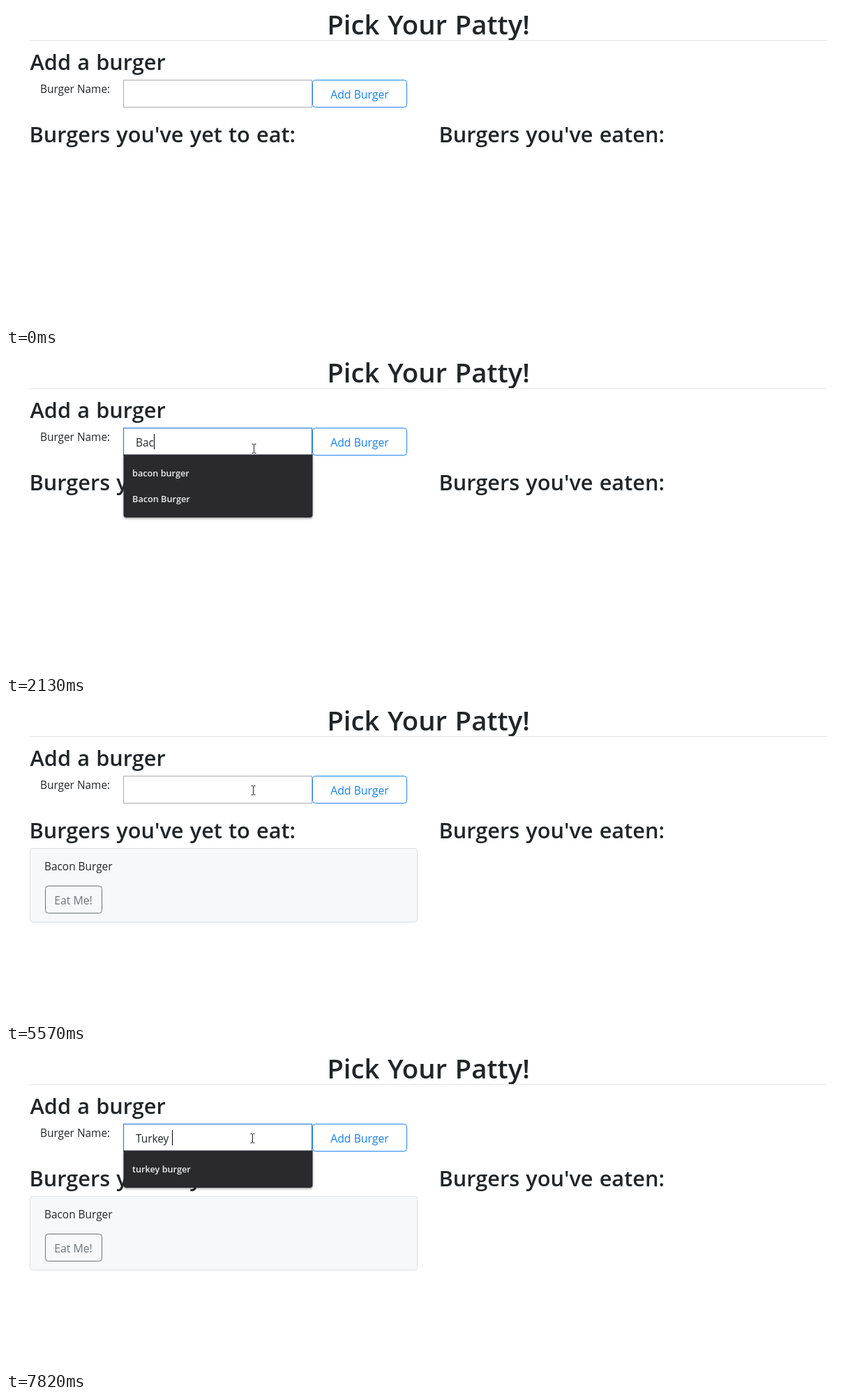
Animation, 1217 px wide and 460 px high, one loop 8 s. Source, as an HTML page:

```html
<!DOCTYPE html>
<html lang="en">
<head>
<meta charset="utf-8">
<title>Burger list</title>
<style>
  html, body { margin: 0; width: 100%; height: 100%; overflow: hidden; background: #fff; }
  svg { display: block; width: 100%; height: 100%; }
  text { font: 15.4px "Open Sans", "Noto Sans", sans-serif; fill: #212529; white-space: pre; }
  .title { font-size: 38.4px; font-weight: 600; word-spacing: 1.5px; }
  .head { font-size: 30.7px; font-weight: 600; word-spacing: 1.2px; }
  .btn { font-size: 15.8px; }
  .mid { text-anchor: middle; }
  #list text { font-size: 12.7px; font-weight: 600; fill: #eceef0; }
</style>
</head>
<body>
<svg viewBox="0 0 1217 460">
  <defs>
    <filter id="shade" x="-5%" y="-10%" width="110%" height="125%">
      <feDropShadow dx="0" dy="1.5" stdDeviation="1.5" flood-color="#000" flood-opacity=".4"/>
    </filter>
  </defs>
  <rect width="1217" height="460" fill="#fff"/>
  <text class="title mid" x="605.5" y="41">Pick Your Patty!</text>
  <path d="M34 49.5H1177" stroke="#e5e5e5"/>
  <text class="head" x="34.5" y="91.5">Add a burger</text>
  <text x="49" y="125">Burger Name:</text>
  <text class="head" x="33.5" y="195.5">Burgers you've yet to eat:</text>
  <text class="head" x="620.5" y="195.5">Burgers you've eaten:</text>

  <g id="card">
    <rect x="34.5" y="210.5" width="555" height="106" rx="4" fill="#f7f8fa" stroke="#dadde0"/>
    <text x="55" y="242">Bacon Burger</text>
    <rect x="56.5" y="264.5" width="81" height="39" rx="4" fill="none" stroke="#6c757d"/>
    <text class="btn mid" x="96.5" y="291" style="fill:#6c757d">Eat Me!</text>
  </g>

  <rect id="field" x="168.5" y="106.5" width="270" height="39" fill="#fff"/>
  <text id="typed" x="186" y="133"></text>
  <path id="caret" d="M.5 115V137" stroke="#000"/>

  <rect id="ring" x="437.5" y="104.5" width="139" height="43" rx="6" fill="none" stroke="#80bdff" stroke-width="3.2"/>
  <rect id="add" x="439.5" y="106.5" width="135" height="39" rx="4" stroke="#1a86f5"/>
  <text id="addText" class="btn mid" x="507" y="133">Add Burger</text>

  <g id="list">
    <path id="panel" fill="#292a2d" filter="url(#shade)"/>
    <g id="rows"></g>
  </g>

  <circle id="spot" r="12" fill="#fdf96c"/>
  <path id="arrow" d="M0 0V16.5L3.8 13L6.3 18.8L8.9 17.7L6.4 12H11.6Z" fill="#fff" stroke="#111"/>
  <path id="beam" d="M-3 -6.5H-.5M.5 -6.5H3M0 -6V6M-3 6.5H-.5M.5 6.5H3" fill="none" stroke="#222"/>
  <path id="hand" d="M-1.5 1Q0 -1.2 1.4 1V6.5Q3 5 4 7Q5.8 5.8 6.6 7.7Q8.8 7 9 9.5V13.5Q8.5 16 7.3 18.5H-.8Q-2 15.5 -5 12Q-5.8 9.5 -3.7 9.8L-1.5 11.8ZM1.4 6.5V9.5M4 7V10M6.6 7.7V10" fill="#fff" stroke="#2e9a4a" stroke-width="1.1"/>
</svg>
<script>
const LOOP = 8000, STEP = 77;
const $ = id => document.getElementById(id);
const clamp = v => Math.max(0, Math.min(1, v));
const within = (t, a, b) => t >= a && t < b;
const show = (id, on) => $(id).setAttribute('visibility', on ? 'visible' : 'hidden');
const set = (id, attrs) => {
  for (const k in attrs) $(id).setAttribute(k, attrs[k]);
};

// Pointer path: time, x, y
const path = [
  [210, 870, 355], [980, 351, 148], [1050, 348.5, 141], [1127, 348.5, 136],
  [1360, 348.5, 136], [1435, 355, 136], [4000, 358, 136], [4231, 475, 137],
  [4480, 482, 134], [5020, 482, 134], [5097, 470, 133], [5330, 380, 128],
  [5559, 354, 127], [5636, 353, 127]
];
const moves = [210, 1050, 4000, 5020];

// One word per run, with the times of its keystrokes
const words = [
  { text: 'Bacon Burger', end: 5020, keys: [1670, 1900, 2130, 2210, 2290, 2360, 2590, 2830, 2910, 3230, 3380, 3470] },
  { text: 'Turkey ', end: LOOP, keys: [6200, 6350, 6750, 7210, 7510, 7740, 7820] }
];

const bacon = ['bacon burger', 'Bacon Burger'];
const turkey = ['turkey burger'];
const recent = [...turkey, ...bacon, 'cheese burger', 'veggie burger', 'burger'];
const lists = [
  [0, []], [1360, recent], [1670, [...bacon, 'big burger', 'burger', 'bbq burger']],
  [1900, bacon], [4610, []], [5640, recent],
  [6200, [...turkey, "This is my garage that i'm renting"]], [6430, turkey]
];
const lastBefore = (items, t, time) => items.filter(i => time(i) <= t).pop();

// The pointer advances in coarse steps, like the screen it was seen on
function pointer(t) {
  const start = lastBefore(moves, t, m => m) ?? 0;
  const q = start + Math.floor((t - start + 8) / STEP) * STEP;
  const i = path.findIndex(p => p[0] > q);
  if (i < 0) return path[path.length - 1].slice(1);
  if (i === 0) return path[0].slice(1);
  const [t0, x0, y0] = path[i - 1], [t1, x1, y1] = path[i];
  let k = (q - t0) / (t1 - t0);
  if (i === 1) k = 1 - (1 - k) ** 2;
  return [x0 + (x1 - x0) * k, y0 + (y1 - y0) * k];
}

function drawField(t) {
  const focus = within(t, 1130, 4610) || t >= 5640;
  const word = words.find(w => t < w.end);
  const count = word.keys.filter(k => k <= t).length;
  const typed = $('typed');
  typed.textContent = word.text.slice(0, count);
  const width = count ? typed.getComputedTextLength() : 0;
  const lastKey = count ? word.keys[count - 1] : word.end === LOOP ? 5640 : 1130;
  const lit = Math.floor((t - lastKey) / 530) % 2 === 0;
  show('caret', focus && lit);
  set('caret', { transform: `translate(${Math.round(186.6 + width)} 0)` });
  set('field', { stroke: focus ? '#3f83da' : '#a9a9a9', 'stroke-width': focus ? 1.3 : 1 });
}

let shown;
function drawList(t) {
  const items = lastBefore(lists, t, l => l[0])[1];
  if (items === shown) return;
  shown = items;
  show('list', items.length > 0);
  const bottom = 161 + 37 * items.length;
  set('panel', { d: `M168.5 144.5H439.5V${bottom - 4}q0 4 -4 4H172.5q-4 0 -4 -4Z` });
  $('rows').innerHTML = items.map((s, i) => `<text x="181" y="${176 + 37 * i}">${s}</text>`).join('');
}

function drawButton(t) {
  const hover = clamp((t - 4212) / 150) - clamp((t - 5170) / 150);
  const mix = (a, b) => Math.round(a + (b - a) * hover);
  set('add', { fill: `rgb(${mix(255, 0)},${mix(255, 123)},255)` });
  $('addText').style.fill = `rgb(${mix(20, 255)},${mix(130, 255)},${mix(245, 255)})`;
  show('ring', within(t, 4610, 5020));
}

function drawPointer(t) {
  const [x, y] = pointer(t);
  const inRow = within(y, 106, 146);
  const kind = !inRow || x >= 575 ? 'arrow' : x < 439 ? 'beam' : 'hand';
  for (const id of ['arrow', 'beam', 'hand']) {
    show(id, t >= 210 && id === kind);
    set(id, { transform: `translate(${Math.floor(x) + 0.5} ${Math.round(y)})` });
  }
  const click = within(t, 1130, 1300) || within(t, 1360, 1440) ||
    within(t, 4610, 4780) || within(t, 5640, 5800);
  show('spot', click);
  set('spot', { cx: x - 1.5, cy: y - 1.5 });
}

function draw(t) {
  show('card', t >= 5020);
  drawField(t);
  drawList(t);
  drawButton(t);
  drawPointer(t);
}

const began = performance.now();
function tick() {
  draw((performance.now() - began) % LOOP);
  requestAnimationFrame(tick);
}
tick();
</script>
</body>
</html>
```
